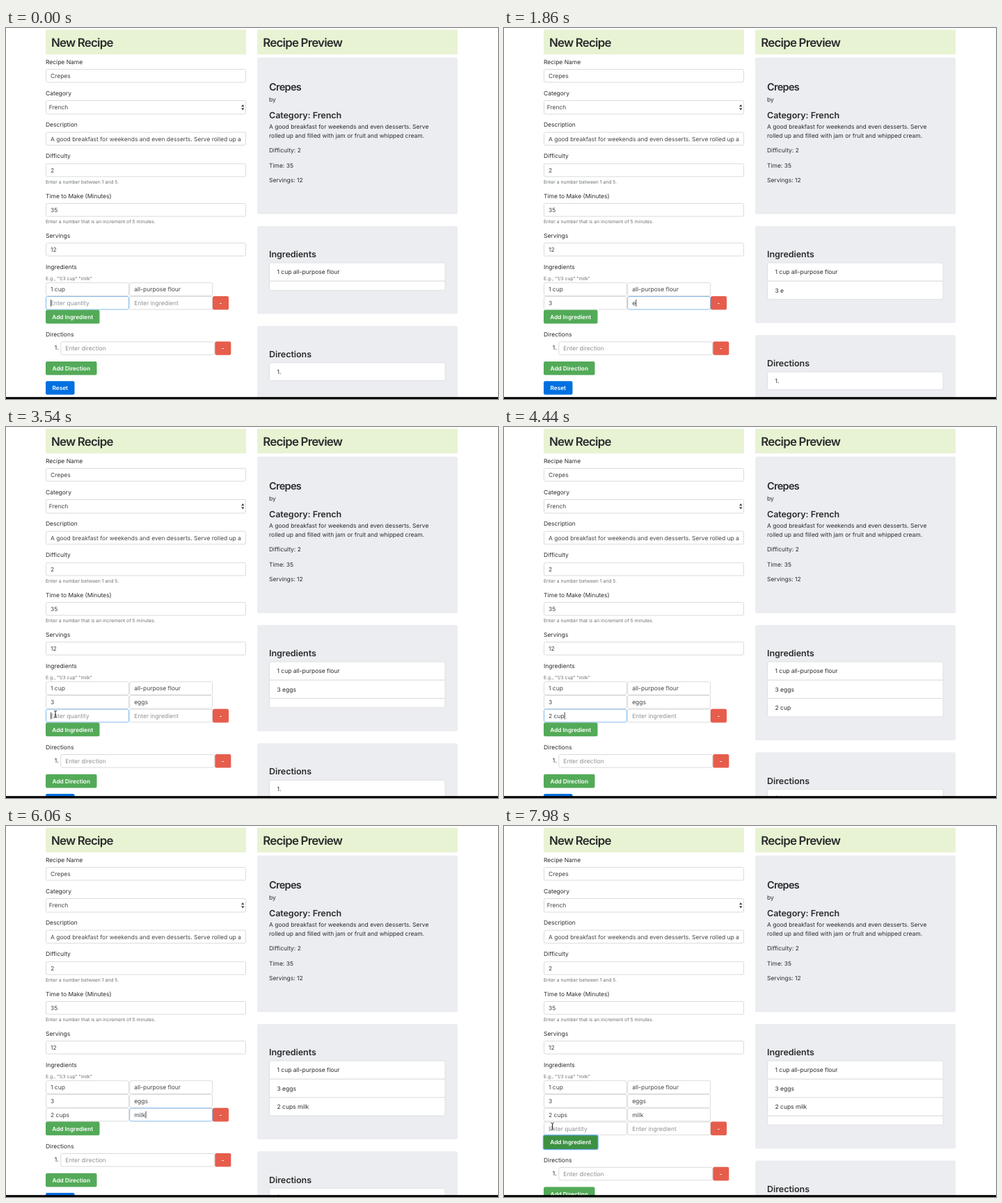
Recreate the animation shown at these times as an HTML page. Size 707 by 534 pixels, loop 8000 ms.

```html
<!DOCTYPE html>
<html lang="en">
<head>
<meta charset="utf-8">
<title>Recipe form</title>
<style>
  html, body { margin: 0; width: 100%; height: 100%; overflow: hidden; background: #fff; }
  svg { display: block; width: 100%; height: 100%; }
  text {
    font: 8.48px Inter, "Open Sans", sans-serif;
    fill: #292b2c;
    white-space: pre;
    text-rendering: geometricPrecision;
  }
  .h2 { font-size: 16.9px; font-weight: 600; letter-spacing: -.8px; }
  .h3 { font-size: 14.5px; font-weight: 600; letter-spacing: -.7px; }
  .h4 { font-size: 12.5px; font-weight: 600; letter-spacing: -.05px; }
  .help { font-size: 6.8px; fill: #6a7074; }
  .value { fill: #414547; }
  .hint { fill: #8c9092; }
  .button { font-size: 8.27px; font-weight: 600; fill: #fff; }
</style>
</head>
<body>
<svg viewBox="0 0 707 534"></svg>
<script>
const svg = document.querySelector('svg');
const LOOP = 8000, STEP = 60;
const GREEN = '#53aa58', DARK_GREEN = '#3d9143', RED = '#e65d4c', BLUE = '#0070e0';
const ROW_TOP = 366.2, ROW = 19.8;

// Keystrokes: [time, row, column, character]; an empty character moves the focus.
const keys = [
  [0, 1, 0, ''],
  [1140, 1, 0, '3'], [1500, 1, 1, ''],
  [1800, 1, 1, 'e'], [1960, 1, 1, 'g'], [2120, 1, 1, 'g'], [2280, 1, 1, 's'],
  [3300, 2, 0, ''],
  [3600, 2, 0, '2'], [3860, 2, 0, ' '], [4060, 2, 0, 'c'],
  [4240, 2, 0, 'u'], [4400, 2, 0, 'p'], [4620, 2, 0, 's'],
  [4900, 2, 1, ''],
  [5160, 2, 1, 'm'], [5300, 2, 1, 'i'], [5440, 2, 1, 'l'], [5600, 2, 1, 'k']
];
const clicks = [2940, 7400];

// Pointer journeys: [time, x, y]; the pointer is hidden outside them.
const journeys = [
  [[2460, 30, 440], [2580, 12, 428], [2740, 71, 408], [3300, 71, 413], [3600, 71, 413]],
  [[6840, 54, 440], [7080, 69.5, 432], [8000, 69.5, 432]]
];

const text = (x, y, str, cls = '', extra = '') =>
  `<text x="${x}" y="${y}" class="${cls}" ${extra}>${str}</text>`;
const rect = (x, y, w, h, fill, r = 0, stroke = 'none') =>
  `<rect x="${x}" y="${y}" width="${w}" height="${h}" rx="${r}" fill="${fill}" stroke="${stroke}"/>`;
const path = (d, fill, stroke = 'none', width = 1) =>
  `<path d="${d}" fill="${fill}" stroke="${stroke}" stroke-width="${width}" stroke-linejoin="round"/>`;
const box = (x, y, w, h = 19.6, stroke = '#dadbdc') =>
  rect(x + .5, y + .5, w - 1, h - 1, '#fff', 2, stroke);

function input(x, y, w, value, hint = '', focused = false) {
  return box(x, y, w, 19.6, focused ? '#84bbea' : undefined)
    + text(x + 7, y + 13, value || hint, value ? 'value' : 'hint',
      focused ? `id="active" data-empty="${value ? '' : 1}"` : '');
}

function button(x, y, w, label, fill) {
  return rect(x, y, w, 19.6, fill, 2.2)
    + text(x + w / 2, y + 13, label, 'button', 'text-anchor="middle"');
}

const panel = (y, h) => rect(361, y, 288, h, '#ecedf1', 2.6);

function staticParts() {
  const fields = [
    [52, 59, 'Recipe Name', 'Crepes'],
    [142, 149.6, 'Description', 'A good breakfast for weekends and even desserts. Serve rolled up a'],
    [187.2, 194.8, 'Difficulty', '2'],
    [244.6, 252, 'Time to Make (Minutes)', '35'],
    [301.5, 309, 'Servings', '12']
  ];
  return rect(57, 2.5, 288, 35.5, '#e8f3d3') + text(65, 27.2, 'New Recipe', 'h2')
    + rect(361, 2.5, 288, 35.5, '#e8f3d3') + text(369.3, 27.2, 'Recipe Preview', 'h2')
    + fields.map(([labelY, y, label, value]) =>
      text(57, labelY, label) + input(57, y, 288, value)).join('')
    + text(57, 96.8, 'Category') + box(57, 104, 288, 20.5) + text(61.7, 116.8, 'French', 'value')
    + path('M338 113.3L340.2 110L342.4 113.3ZM338 115.2L340.2 118.5L342.4 115.2Z', '#444')
    + text(57, 224.2, 'Enter a number between 1 and 5.', 'help')
    + text(57, 281.4, 'Enter a number that is an increment of 5 minutes.', 'help')
    + text(57, 346.5, 'Ingredients')
    + text(57, 363.3, 'E.g., "1/3 cup" "milk"', 'help')
    + panel(42.5, 225.5)
    + text(378, 90, 'Crepes', 'h3') + text(378, 106, 'by')
    + text(378, 129.8, 'Category: French', 'h4')
    + text(378, 145.2, 'A good breakfast for weekends and even desserts. Serve')
    + text(378, 157.9, 'rolled up and filled with jam or fruit and whipped cream.')
    + text(378, 179.2, 'Difficulty: 2') + text(378, 200.5, 'Time: 35') + text(378, 222, 'Servings: 12');
}
const fixed = staticParts();

function stateAt(t) {
  const rows = [['1 cup', 'all-purpose flour'], ['', '']];
  const clicked = clicks.filter(c => t >= c);
  clicked.forEach(() => rows.push(['', '']));
  const past = keys.filter(k => t >= k[0]);
  past.forEach(([, row, col, char]) => rows[row][col] += char);
  const last = past[past.length - 1];
  const buttonFocused = clicked.length > 0 && clicked[clicked.length - 1] > last[0];
  return { rows, last, buttonFocused };
}

function pointerAt(t) {
  const stops = journeys.find(j => t >= j[0][0] && t < j[j.length - 1][0]);
  if (!stops) return null;
  const i = stops.findIndex(s => s[0] > t);
  const [t0, x0, y0] = stops[i - 1], [t1, x1, y1] = stops[i];
  const p = (t - t0) / (t1 - t0), ease = p * p * (3 - 2 * p);
  return { x: x0 + (x1 - x0) * ease, y: y0 + (y1 - y0) * ease };
}

function form({ rows, last, buttonFocused }, hovered, addY) {
  const lastY = addY - ROW;
  let out = rows.map((row, r) => row.map((value, c) =>
    input(57 + c * 120.2, ROW_TOP + r * ROW, 119.8, value,
      ['Enter quantity', 'Enter ingredient'][c],
      !buttonFocused && last[1] === r && last[2] === c)).join('')).join('');
  out += button(297, lastY, 23, '-', RED);
  if (buttonFocused) out += rect(55.8, addY - 1.2, 79.9, 22, '#6aa9ea', 3);
  return out
    + button(57, addY, 77.5, 'Add Ingredient', hovered || buttonFocused ? DARK_GREEN : GREEN)
    + text(57, addY + 38.2, 'Directions') + text(69.7, addY + 57.6, '1.')
    + input(78.3, addY + 45.4, 221.5, '', 'Enter direction')
    + button(300.3, addY + 45.4, 23, '-', RED)
    + button(57, addY + 74.2, 73.5, 'Add Direction', GREEN)
    + button(57, addY + 102.4, 41.5, 'Reset', BLUE);
}

function preview(rows) {
  const top = 337.5;
  let y = top, items = '';
  for (const row of rows) {
    const label = row.join(' ').trim(), h = label ? 26.4 : 13.3;
    items += box(378, y, 253.5, h + .8, '#dfe0e2') + text(389.5, y + 16.6, label);
    y += h;
  }
  const next = y + 51.6;
  return panel(285, y + 34.4 - 285) + text(378, 330.4, 'Ingredients', 'h4') + items
    + panel(next, 200) + text(378, next + 45.2, 'Directions', 'h4')
    + box(378, next + 52.6, 253.5, 26.6, '#dfe0e2') + text(389.5, next + 69, '1.');
}

function drawPointer({ x, y }, kind) {
  const shapes = {
    hand: path('M-1.2 .8Q0-.8 1 .8V4Q2 3.2 2.8 4.2Q3.8 3.6 4.5 4.7Q5.8 4.4 5.8 6V8L4.6 11H-.4L-3.6 6.8Q-3.2 5.2-1.2 6.8Z', '#fff', '#111', .9),
    beam: path('M-2-4.5Q0-4.5 0-3.3Q0-4.5 2-4.5M0-3.3V3.7M-2 5Q0 5 0 3.7Q0 5 2 5M-1 1H1', 'none', '#222'),
    arrow: path('M0 0V10L2.4 7.8L4 11.3L5.7 10.5L4.1 7.2H7.2Z', '#111', '#fff', .8)
  };
  return `<g transform="translate(${x} ${y})">${shapes[kind]}</g>`;
}

let shown = '';
function frame(now) {
  const t = Math.floor(now % LOOP / STEP) * STEP;
  const state = stateAt(t), pointer = pointerAt(t);
  const addY = ROW_TOP + state.rows.length * ROW;
  const inside = pointer && pointer.x >= 57 && pointer.x < 134.5;
  const hovered = inside && pointer.y >= addY && pointer.y < addY + 19.6;
  const overField = inside && pointer.y >= ROW_TOP && pointer.y < addY;
  const kind = hovered ? 'hand' : overField ? 'beam' : 'arrow';
  const caretOn = !state.buttonFocused && (t - state.last[0]) % 1000 < 500;

  const scene = fixed + form(state, hovered, addY) + preview(state.rows)
    + (caretOn ? '<rect id="caret" width=".9" height="10" fill="#333"/>' : '')
    + (pointer ? drawPointer(pointer, kind) : '')
    + rect(0, 531.2, 707, 3, '#000');

  if (scene !== shown) {
    svg.innerHTML = shown = scene;
    const caret = svg.querySelector('#caret'), active = svg.querySelector('#active');
    if (caret) {
      const width = active.dataset.empty ? 0 : active.getComputedTextLength();
      caret.setAttribute('x', +active.getAttribute('x') + width + .2);
      caret.setAttribute('y', active.getAttribute('y') - 8.2);
    }
  }
  requestAnimationFrame(frame);
}
requestAnimationFrame(frame);
</script>
</body>
</html>
```
